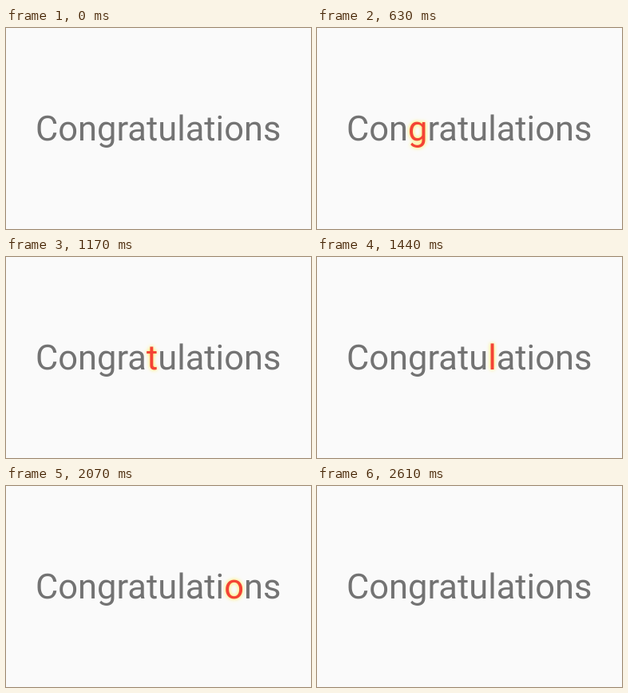
These frames come from a looping animation (382 px wide and 252 px high, 2880 ms). An HTML page:

```html
<!DOCTYPE html>
<html lang="en">
<head>
<meta charset="utf-8">
<title>Congratulations</title>
<style>
  html, body {
    margin: 0;
    width: 100%;
    height: 100%;
    overflow: hidden;
    background: #fafafa;
  }
  #word {
    position: absolute;
    left: 37px;
    top: 105px;
    font: 43.45px/43px Roboto, sans-serif;
    text-rendering: geometricPrecision;
    white-space: nowrap;
    color: #737373;
  }
  .lit {
    color: #f44336;
    text-shadow: 0 0 5px #ffeb3b;
  }
</style>
</head>
<body>
<div id="word"></div>
<script>
  const LOOP = 2880;
  const TICK = 90;            // the highlight moves on a 90 ms grid
  const TICKS_PER_LETTER = 1.8;
  const START_TICK = 1.3;

  const word = document.getElementById('word');
  const letters = [...'Congratulations'].map(char => {
    const span = document.createElement('span');
    span.textContent = char;
    word.append(span);
    return span;
  });

  function draw(now) {
    const tick = Math.floor((now % LOOP) / TICK);
    const active = Math.floor((tick - START_TICK) / TICKS_PER_LETTER);
    letters.forEach((span, i) => span.classList.toggle('lit', i === active));
  }

  const start = performance.now();
  function loop() {
    draw(performance.now() - start);
    requestAnimationFrame(loop);
  }
  loop();
</script>
</body>
</html>
```
